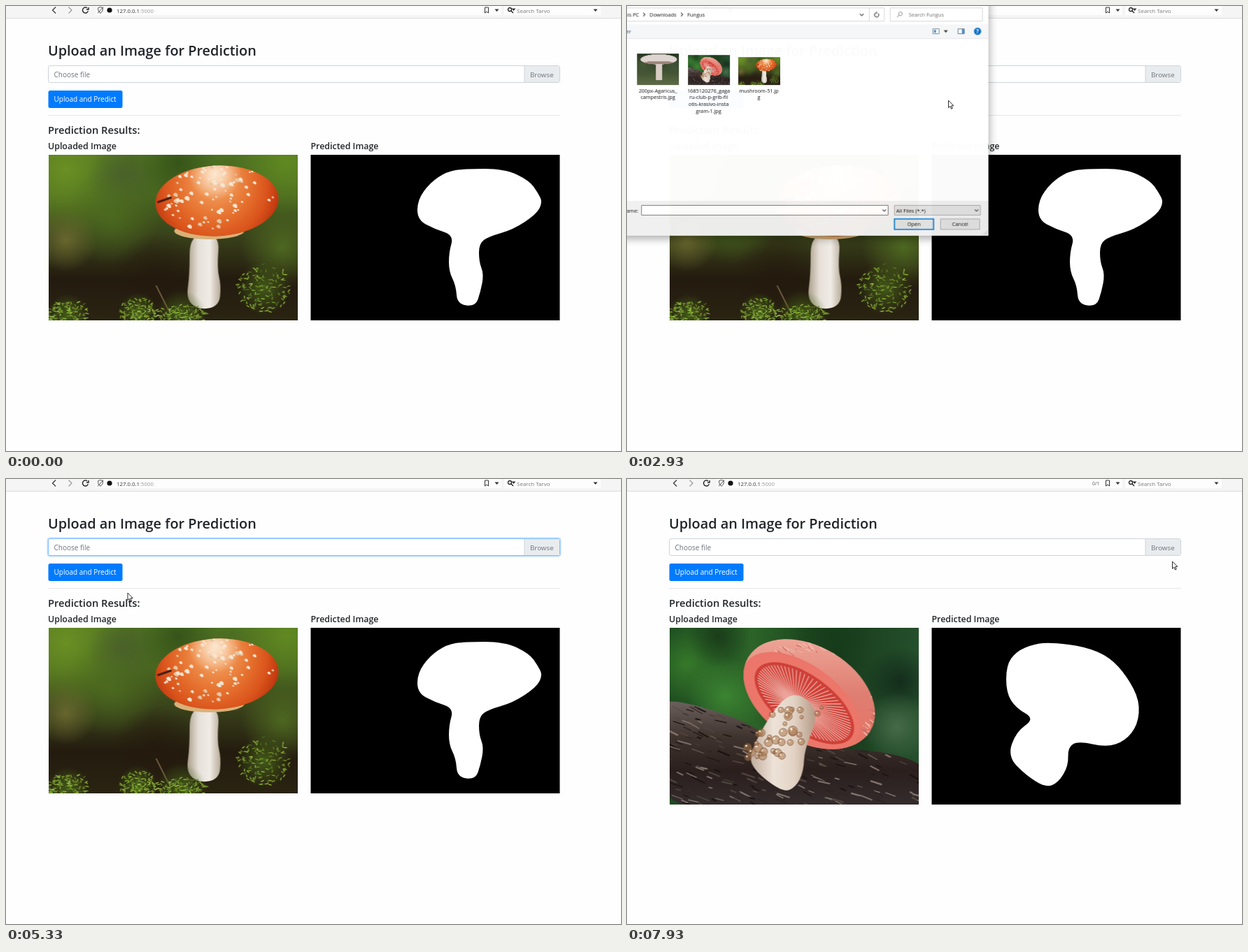
An HTML page with a canvas for the animation above (8 s loop, 879 by 637 pixels).

```html
<!DOCTYPE html>
<html lang="en">
<head>
<meta charset="utf-8">
<title>Upload an Image for Prediction</title>
<style>
  html, body { margin: 0; width: 100%; height: 100%; overflow: hidden; background: #fff; }
  canvas { display: block; }
</style>
</head>
<body>
<canvas id="stage" width="879" height="637"></canvas>
<script>
const LOOP = 8000, W = 879, H = 637;
const FONT = '"Open Sans", "Noto Sans", sans-serif';
const FILE = '1685120276_gagaru-club-p-grib-filotis-krasivo-instagram-1.jpg';
const INK = '#212529', DARK = '#333', MID = '#555';
const stage = document.getElementById('stage').getContext('2d');
let c = stage; // current drawing target

// ---------- helpers ----------
const between = (t, a, b) => t >= a && t < b;
const clamp = v => Math.max(0, Math.min(1, v));
const smooth = v => v * v * (3 - 2 * v);

function random(seed) {
  return () => (seed = (seed * 16807) % 2147483647) / 2147483647;
}
function layer(w, h, dx, dy) {
  const cv = document.createElement('canvas');
  cv.width = w; cv.height = h;
  const g = cv.getContext('2d');
  g.translate(dx, dy);
  return g;
}
function rect(x, y, w, h, fill) { c.fillStyle = fill; c.fillRect(x, y, w, h); }
function box(x, y, w, h, fill, border, r = 0, lw = 1) {
  c.beginPath(); c.roundRect(x, y, w, h, r);
  if (fill) { c.fillStyle = fill; c.fill(); }
  if (border) { c.strokeStyle = border; c.lineWidth = lw; c.stroke(); }
}
function text(s, x, y, size, fill = INK, align = 'left', weight = 400) {
  c.font = `${weight} ${size}px ${FONT}`;
  c.textAlign = align; c.fillStyle = fill;
  c.fillText(s, x, y);
}
const title = (s, x, y, size) => text(s, x, y, size, INK, 'left', 600);
const label = (s, x, y, align, fill = '#111') => text(s, x, y, 7.4, fill, align);
function line(x, y, x2, y2, color, lw = 1) {
  c.beginPath(); c.moveTo(x, y); c.lineTo(x2, y2);
  c.strokeStyle = color; c.lineWidth = lw; c.stroke();
}
function chevron(x, y, dx, dy, color = MID, lw = 1.2) { // tip at x, y
  c.beginPath(); c.moveTo(x - dx, y - dy);
  c.lineTo(x, y);
  c.lineTo(x + (dx === dy ? dx : -dx), y + (dx === dy ? -dy : dy));
  c.strokeStyle = color; c.lineWidth = lw; c.stroke();
}
function icon(d, x, y, fill, color, lw = 1) {
  const p = new Path2D(d);
  c.save(); c.translate(x, y);
  if (fill) { c.fillStyle = fill; c.fill(p); }
  if (color) { c.strokeStyle = color; c.lineWidth = lw; c.stroke(p); }
  c.restore();
}
const caret = (x, y) => icon('M-3-1.5H3L0 2Z', x, y, DARK);
function oval(x, y, rx, ry, fill, turn = 0) {
  c.beginPath(); c.ellipse(x, y, rx, ry, turn, 0, 7);
  c.fillStyle = fill; c.fill();
}
function ring(x, y, r, color, lw, a = 0, b = 7) {
  c.beginPath(); c.arc(x, y, r, a, b);
  c.strokeStyle = color; c.lineWidth = lw; c.stroke();
}
// closed curve rounded through the midpoints of the given corners
function curve(p, fill) {
  const n = p.length;
  c.beginPath();
  c.moveTo((p[n - 2] + p[0]) / 2, (p[n - 1] + p[1]) / 2);
  for (let i = 0; i < n; i += 2)
    c.quadraticCurveTo(p[i], p[i + 1], (p[i] + p[(i + 2) % n]) / 2, (p[i + 1] + p[(i + 3) % n]) / 2);
  c.fillStyle = fill; c.fill();
}
function glow(x, y, r, color) {
  const g = c.createRadialGradient(x, y, 0, x, y, r);
  g.addColorStop(0, color + 'd8');
  g.addColorStop(1, color + '00');
  rect(x - r, y - r, 2 * r, 2 * r, g);
}
function spread(g, colors) {
  colors.forEach((col, i) => g.addColorStop(i / (colors.length - 1), col));
  return g;
}
const across = (x0, x1, ...colors) => spread(c.createLinearGradient(x0, 0, x1, 0), colors);
const down = (y0, y1, ...colors) => spread(c.createLinearGradient(0, y0, 0, y1), colors);

// ---------- pictures ----------
function photo(h, draw) {
  c = layer(356, h, -60, -213);
  draw();
  return c.canvas;
}

const redCap = photo(237, () => {
  const rnd = random(77);
  rect(60, 213, 356, 237, down(213, 450, '#4d7022', '#48651f', '#38401a', '#241b0f', '#2a2412'));
  glow(85, 235, 95, '#709624');
  glow(165, 245, 50, '#485c2c');
  glow(245, 225, 55, '#325018');
  glow(400, 225, 75, '#648e22');
  glow(150, 300, 70, '#4e6e20');
  glow(85, 335, 45, '#706e32');
  glow(215, 390, 65, '#241a0e');
  glow(395, 345, 60, '#527022');
  line(214, 400, 232, 436, '#85704e', 1.5);
  curve([262, 326, 305, 326, 301, 375, 307, 400, 304, 430, 275, 435, 257, 420, 262, 385],
    across(258, 307, '#a89c88', '#e6e0d8', '#f0ece6', '#b5a896'));
  const moss = (mx, my, sx, sy) => {
    glow(mx, my, sx, '#48641a');
    for (let i = 0; i < 130; i++) {
      const a = rnd() * 6.3, b = rnd() * 6.3, d = Math.sqrt(rnd());
      const x = mx + Math.cos(a) * d * sx, y = my + Math.sin(a) * d * sy;
      line(x, y, x + 5 * Math.cos(b), y + 4 * Math.sin(b),
        `hsl(${72 + rnd() * 16} 55% ${24 + rnd() * 34}%)`, 1.2);
    }
  };
  moss(88, 442, 30, 20);
  moss(188, 438, 28, 20);
  moss(250, 443, 36, 14);
  moss(368, 404, 38, 34);
  oval(290, 322, 50, 12, '#d9b178');
  const skin = c.createRadialGradient(300, 245, 5, 297, 262, 98);
  oval(301, 279, 88, 50.5, spread(skin, ['#f6b480', '#ee8e4c', '#e6702e', '#da541c', '#b92f0c']), -0.05);
  c.save(); c.clip();
  glow(298, 240, 38, '#fff0dc');
  for (let i = 0; i < 95; i++) {
    const a = rnd() * 6.3, d = Math.pow(rnd(), 0.65);
    const x = 300 + Math.cos(a) * d * 86, y = 272 + Math.sin(a) * d * 50 - (1 - d) * 22, r = 1.5 + rnd() * 3;
    curve([x - r, y, x, y - r, x + r, y - r / 2, x + r, y + r], i % 4 ? '#f6e5d0' : '#e5c5a2');
  }
  c.restore();
  line(216, 281, 236, 274, '#4c1d10', 3);
});

const pinkCap = photo(253, () => {
  const rnd = random(41);
  rect(60, 213, 356, 253, across(60, 416, '#1d4a20', '#2c6428', '#173a1c', '#25502c'));
  glow(85, 265, 60, '#3a802c');
  glow(140, 310, 55, '#408c34');
  glow(130, 225, 45, '#183818');
  glow(290, 220, 60, '#163e1a');
  glow(390, 290, 50, '#12281a');
  glow(385, 355, 50, '#4c704e');
  curve([40, 318, 85, 319, 170, 347, 205, 372, 265, 380, 440, 400, 440, 490, 30, 490],
    down(320, 466, '#6a5f5b', '#40342f', '#2a1f1d', '#352c2d'));
  c.save(); c.clip();
  for (let i = 0; i < 260; i++) {
    const x = 55 + rnd() * 360, y = 320 + rnd() * 146, l = 5 + rnd() * 15;
    line(x, y, x + l, y + l * (0.2 + rnd() * 0.4),
      ['#1c1412', '#80736c', '#50433e', '#2e2422'][i % 4], 0.8 + rnd() * 1.8);
  }
  c.restore();
  oval(260, 308, 102, 68, down(229, 387, '#eda596', '#df7e72', '#e87365'), 0.55);
  c.save(); c.clip();
  for (let i = 0; i < 150; i++) {
    const a = -2.7 + rnd() * 3.4, d = 0.86 + rnd() * 0.16;
    const x = 262 + 98 * d * Math.cos(a), y = 312 + 80 * d * Math.sin(a);
    line(x, y, x + 7, y + 2 + 6 * rnd(), i % 2 ? '#f4c3b4' : '#cc6a60', 1.1);
  }
  oval(249, 318, 96, 52, '#eb7669', 0.63);
  oval(253, 321, 83, 40, '#cf4038', 0.63);
  for (let i = 0; i < 70; i++) {
    const a = i * Math.PI / 35, u = 78 * Math.cos(a), v = 36 * Math.sin(a);
    line(240, 322, 253 + u * 0.81 - v * 0.59, 321 + u * 0.59 + v * 0.81, '#eda79d', 1.3);
  }
  c.restore();
  curve([213, 324, 238, 306, 262, 318, 272, 342, 253, 388, 252, 418, 241, 441, 222, 449, 176, 413, 177, 386],
    across(180, 268, '#c6b3a4', '#eee3d8', '#e2d2c4', '#b69c88'));
  for (let i = 0; i < 38; i++) {
    const q = rnd(), x = 244 - 48 * q + (rnd() - 0.5) * 70, y = 318 + 78 * q + rnd() * 12, r = 2 + rnd() * 5;
    oval(x, y, r, r, '#ac7a4e8c');
    ring(x, y, r, '#704228b0', 0.8);
    oval(x - r / 3, y - r / 3, r / 4, r / 4, '#fff2df');
  }
});

const whiteCap = photo(267, () => {
  rect(60, 213, 356, 267, down(213, 480, '#24331f', '#3a4c2c', '#5c6944'));
  glow(110, 310, 90, '#465a36');
  glow(370, 320, 90, '#425436');
  rect(222, 280, 50, 160, '#d8cbc4');
  oval(245, 262, 155, 44, '#ded4d0');
  oval(245, 290, 120, 14, '#9c8278');
});

const redMask = [655, 233, 713, 233, 748, 250, 760, 267, 767, 281, 758, 298, 725, 320, 690, 330, 676, 340, 676, 366,
  683, 384, 678, 410, 671, 430, 645, 427, 643, 400, 633, 380, 633, 353, 640, 328, 612, 319, 588, 306, 588, 278,
  606, 253, 630, 237];
const pinkMask = [607, 234, 655, 240, 690, 255, 715, 283, 733, 318, 730, 352, 712, 375, 685, 384, 645, 375, 630, 384,
  631, 410, 617, 434, 599, 442, 570, 424, 544, 397, 556, 362, 583, 343, 556, 328, 542, 306, 542, 267, 556, 247,
  582, 236];

// ---------- page ----------
function browserBar(loading, counted) {
  rect(0, 0, W, 17, '#f5f5f5');
  rect(0, 17, W, 1, '#dcdcdc');
  rect(128, 0, 580, 13, '#fdfdfd');
  rect(712, 0, 138, 13, '#fdfdfd');
  if (loading) rect(183, 0, 525, 13, '#ffcece');
  chevron(66.5, 6, -4.5, 4.5, DARK);
  chevron(94, 6, 4.5, -4.5, '#999');
  if (loading) icon('M-4-4L4 4M4-4L-4 4', 113.7, 6, null, '#222', 1.4);
  else {
    ring(113.5, 6, 4, '#222', 1.4, 0.3, 5.4);
    icon('M4-4V-1H1', 114, 6, null, '#222', 1.4);
  }
  icon('M-3.5-3.5L0-4.5 3.5-3.5 3 1 0 4.5-3 1ZM-4 4.5L4-4.5', 135, 6, null, MID);
  oval(148, 6, 3.6, 3.6, '#111');
  text('127.0.0.1', 158, 9.7, 7.8, DARK);
  text(':5000', 158 + c.measureText('127.0.0.1').width, 9.7, 7.8, '#999');
  if (counted) text('0/1', 665, 9, 6.8, MID);
  icon('M-2.5-4H2.5V4L0 2-2.5 4Z', 687, 6, null, DARK);
  caret(701.5, 6);
  ring(720, 5, 2.5, '#222', 1.3);
  line(722, 7, 725, 10, '#222', 1.4);
  caret(725.5, 5);
  text('Search Tarvo', 730, 9.7, 8, '#777');
  caret(842.5, 6);
}

function page(t) {
  rect(0, 0, W, H, '#fefefe');
  browserBar(between(t, 5640, 6320), t >= 5640);
  title('Upload an Image for Prediction', 60, 70.5, 19.85);

  const focus = between(t, 1580, 1980) || between(t, 4790, 5570);
  if (focus) box(59.5, 84.5, 733, 26, null, '#bfdeff', 3.5, 2);
  box(60.5, 85.5, 731, 24, '#fff', focus ? '#80bdff' : '#ced4da', 2.5);
  rect(741, 86, 50, 23, '#e9ecef');
  rect(740.5, 86, 1, 23, '#ced4da');
  text('Choose file', 68.5, 101.5, 10, '#6c757d');
  text('Browse', 749, 101.5, 9.8, '#6c757d');

  if (between(t, 5570, 6000)) box(59.5, 120, 108, 27, null, '#bfdeff', 3.5, 2);
  box(60.5, 121, 106, 25, '#007bff', null, 2.5);
  text('Upload and Predict', 68.5, 137, 10, '#fff');
  rect(60, 156, 732, 1, '#e7e7e7');
  title('Prediction Results:', 60, 183, 14.7);
  title('Uploaded Image', 60, 205, 12.4);
  title('Predicted Image', 435.5, 205, 12.4);

  if (between(t, 6000, 6130)) return;
  const done = t >= 6130, pic = done ? pinkCap : redCap;
  c.drawImage(pic, 60.5, 213);
  rect(435.5, 213, 356, pic.height, '#000');
  curve(done ? pinkMask : redMask, '#fff');
}

// ---------- file dialog ----------
function tile(x, y, h, pic, ...names) {
  c.drawImage(pic, x - 30, y, 60, h);
  names.forEach((s, i) => text(s, x, 123.5 + i * 9.8, 7.3, '#111', 'center'));
}
function button(x, name, fill, border, lw) {
  box(x, 305, 56, 15, fill, border, 0, lw);
  label(name, x + 28, 315, 'center');
}

function dialog(t) {
  const picked = t >= 3600, closing = t >= 4600, hover = t >= 4250;
  c.clearRect(-40, -40, 960, 700);
  c.shadowColor = '#0006'; c.shadowBlur = 13; c.shadowOffsetY = 3;
  rect(-40, -40, 557, 369, '#fff');
  c.shadowColor = 'transparent';
  box(-60, 2.5, 428, 19, '#fff', '#d9d9d9');
  line(346.5, 2, 346.5, 21, '#d9d9d9');
  box(376.5, 2.5, 132, 19, '#fff', '#d9d9d9');
  label('This PC', 17, 14.5, 'right');
  label('Downloads', 32, 14.5);
  label('Fungus', 86, 14.5);
  chevron(25.5, 12, 2.5, -2.5);
  chevron(79.5, 12, 2.5, -2.5);
  chevron(335.7, 13.7, 2.7, 2.7);
  ring(357, 12.5, 3, MID, 1.1, -0.8, 4.4);
  line(357, 7.5, 357, 11, MID);
  ring(391, 11, 2.6, '#888', 0.9);
  line(389, 13, 386, 16, '#888');
  label('Search Fungus', 403, 14.5, 'left', '#6d6d6d');

  rect(-40, 26, 557, 20, '#f5f6f7');
  rect(-40, 46, 557, 1, '#e8e9ea');
  label('New folder', 5.5, 38.5, 'right', '#1e3287');
  box(437.5, 32.5, 9, 7, '#fff', '#7a8794');
  rect(439, 34, 3, 4, '#4a90c8');
  caret(456, 36);
  box(473.5, 32.5, 9, 7, '#fff', '#6a7f94');
  rect(479, 33, 3, 6, '#4a90c8');
  oval(501.5, 36, 5.2, 5.2, '#0f6fc5');
  text('?', 501.5, 39, 8, '#fff', 'center', 700);

  if (picked) box(82.5, 51.5, 69, 105, closing ? '#d9d9d9' : '#cce8ff', closing ? '#d9d9d9' : '#99d1ff');
  tile(44, 68, 45, whiteCap, '200px-Agaricus_', 'campestris.jpg');
  tile(116.5, 70, 43, pinkCap, '1685120276_gaga', 'ru-club-p-grib-fil', 'otis-krasivo-insta', 'gram-1.jpg');
  tile(188.5, 73, 40, redCap, 'mushroom-51.jp', 'g');

  rect(-40, 279, 557, 50, '#f0f0f0');
  label('File name:', 16, 295.5, 'right');
  box(20.5, 285.5, 353, 14, '#fff', picked && !closing ? '#0078d7' : '#7a7a7a');
  if (picked) {
    c.font = `7.3px ${FONT}`;
    if (closing) rect(22.5, 288, c.measureText(FILE).width + 1, 9.5, '#0078d7');
    text(FILE, 23, 295.5, 7.3, closing ? '#fff' : '#111', 'left');
  }
  chevron(368, 294, 2.5, 2.5);
  box(382.5, 285.5, 123, 14, '#e1e1e1', '#adadad');
  label('All Files (*.*)', 385, 295.5);
  chevron(500, 294, 2.5, 2.5);
  button(382.5, 'Open', hover ? '#e0f0fc' : '#e1e1e1', '#0078d7', 1.6);
  button(448.5, 'Cancel', '#e1e1e1', '#adadad', 1);
  for (let i = 0; i < 3; i++)
    for (let j = 0; j <= i; j++) rect(514 - 2 * j, 322 + 2 * i, 1, 1, '#aaa');
}

const dialogLayer = layer(960, 700, 40, 40);
const dialogOpen = t => between(t, 2770, 4860);
function showDialog(t) {
  if (!dialogOpen(t)) return;
  c = dialogLayer;
  dialog(t);
  c = stage;
  const opening = smooth(clamp((t - 2730) / 220)), leaving = clamp((t - 4660) / 200);
  const k = 0.93 + 0.07 * opening - 0.043 * leaving;
  c.save();
  c.globalAlpha = opening * (1 - leaving);
  c.translate(190, 165); c.scale(k, k); c.translate(-230, -205);
  c.drawImage(dialogLayer.canvas, 0, 0);
  c.restore();
}

// ---------- pointer ----------
const PATH = [ // start, end, x, y reached
  [0, 190, 852, 611], [190, 920, 150, 128], [1040, 1500, 434, 98], [1920, 2180, 435, 118],
  [2180, 2400, 430, 147], [2400, 2560, 474, 140], [2640, 2720, 474, 137], [2850, 3520, 115, 94],
  [3800, 4320, 418, 315], [4800, 5500, 132, 137], [6040, 6740, 780, 122], [7000, 7130, 780, 120],
  [7900, 7930, 779.5, 118],
];
const CLICKS = [[1500, 1650], [3580, 3800], [4390, 4600], [5510, 5770]];

function pointer(t) {
  if (t < 190) return;
  let x = 852, y = 611;
  for (const [a, b, px, py] of PATH) {
    const e = smooth(clamp((t - a) / (b - a)));
    x += (px - x) * e;
    y += (py - y) * e;
  }
  if (CLICKS.some(([a, b]) => between(t, a, b))) oval(x - 1, y + 2, 9, 9, '#fad71ebf');
  if (between(t, 1920, 2770)) {
    const a = t / 160;
    ring(x, y, 5.2, '#2f9be6', 3.4);
    ring(x, y, 5.2, '#62b8f0', 3.4, a, a + 1.5);
    return;
  }
  const hand = x > 60 && x < 167 && y > 121 && y < 146 && !dialogOpen(t);
  icon(hand
    ? 'M-1 1Q0-1 1 1V5L5 6 7 7V10L6 14H0L-3 9Q-4 7-2 8L-1 9Z'
    : 'M0 0V10.4L2.4 8.2 4 12 5.7 11.2 4.1 7.6 7.3 7.4Z', x, y, '#fff', '#111', 0.9);
}

function frame(now) {
  const t = now % LOOP;
  c = stage;
  page(t);
  showDialog(t);
  pointer(t);
  requestAnimationFrame(frame);
}
requestAnimationFrame(frame);
</script>
</body>
</html>
```
